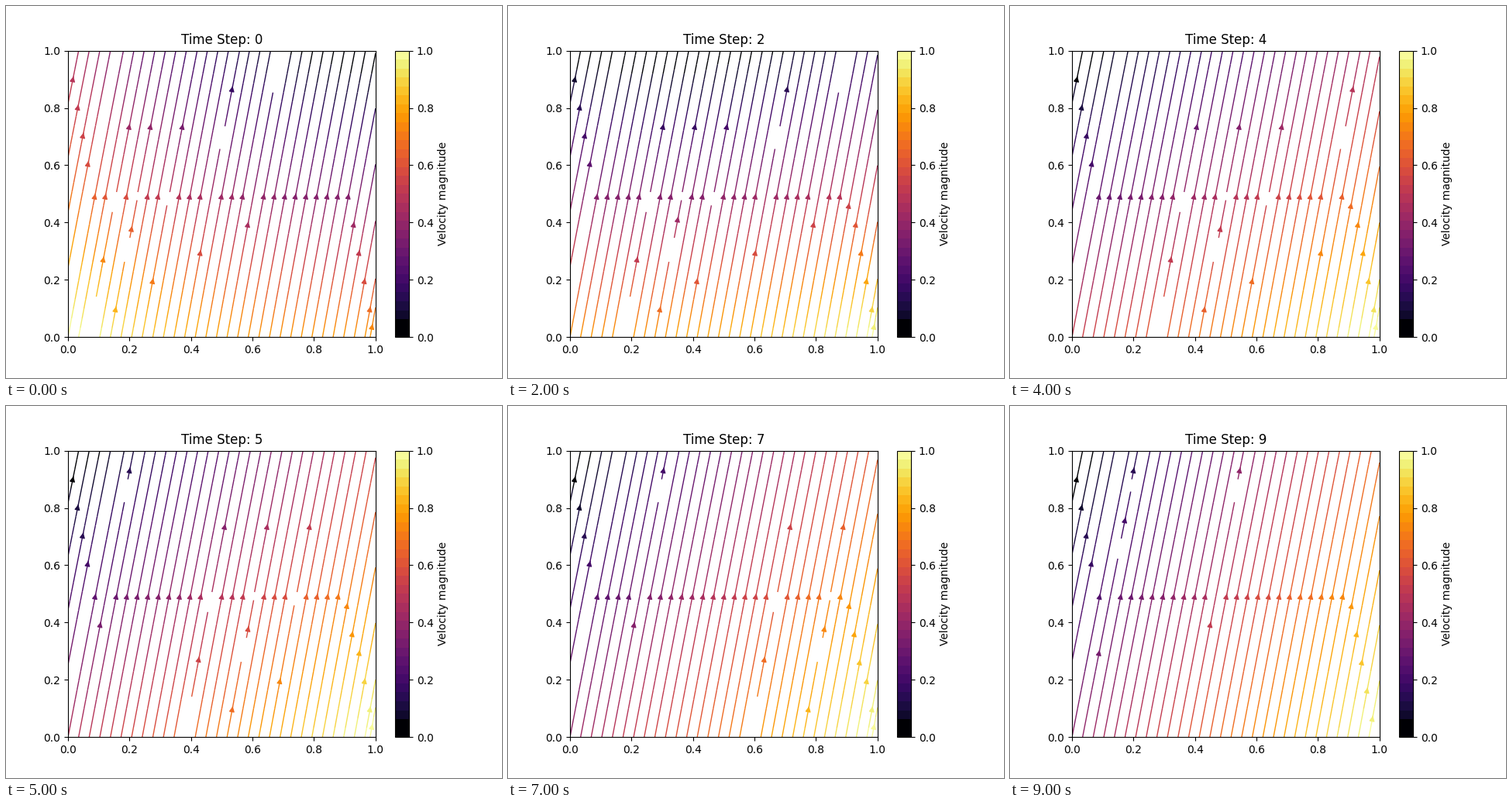
Write a matplotlib script that moves like this. It is 640x480 px and loops after 10000 ms.

```python
import numpy as np
import matplotlib.pyplot as plt
from matplotlib.animation import FuncAnimation
from matplotlib.cm import ScalarMappable
from matplotlib.colors import ListedColormap, Normalize

STEPS = 10
GRID = np.linspace(0, 1, 40)
X, Y = np.meshgrid(GRID, GRID)

# Magnitude scale in even bands, the lowest two black
BANDS = 32
levels = (np.arange(BANDS) + 0.5) / BANDS
levels[:2] = 0
cmap = ListedColormap(plt.get_cmap("inferno")(levels))
norm = Normalize(0, 1)


def slope(t):
    """Steepness of the flow: grows to the right, falls upward and with time."""
    bend = X - 0.45 * X**2 + 0.07 * X**3
    drift = 0.048 * t + 0.14 * (t / 9) ** 4
    return 5.713 + (0.39 - 0.006 * t) * (bend - Y - drift)


def magnitude(t):
    """Speed scaled to 0..1; its gradient turns from leftward to rightward."""
    fade = np.exp(-t / 3.5)
    tilt = -0.87 + 0.46 * t - 0.0215 * t**2
    speed = (-Y + (0.04 + 0.2 * fade) * Y**2 + tilt * X
             + 0.55 * fade * X**2 + (0.12 - 0.45 * fade) * X * Y)
    return (speed - speed.min()) / np.ptp(speed)


fig, ax = plt.subplots(figsize=(6.4, 4.8), dpi=100)
fig.colorbar(ScalarMappable(norm, cmap), ax=ax, label="Velocity magnitude")


def reset():
    ax.clear()
    ax.set(xlim=(0, 1), ylim=(0, 1))
    return []


def update(t):
    reset()
    ax.set_title(f"Time Step: {t}")
    ax.streamplot(GRID, GRID, 1 / slope(t), np.ones_like(X),
                  color=magnitude(t), cmap=cmap, norm=norm, linewidth=1)
    return []


anim = FuncAnimation(fig, update, frames=STEPS, init_func=reset,
                     interval=1000, repeat=True, repeat_delay=0)
plt.show()
```
